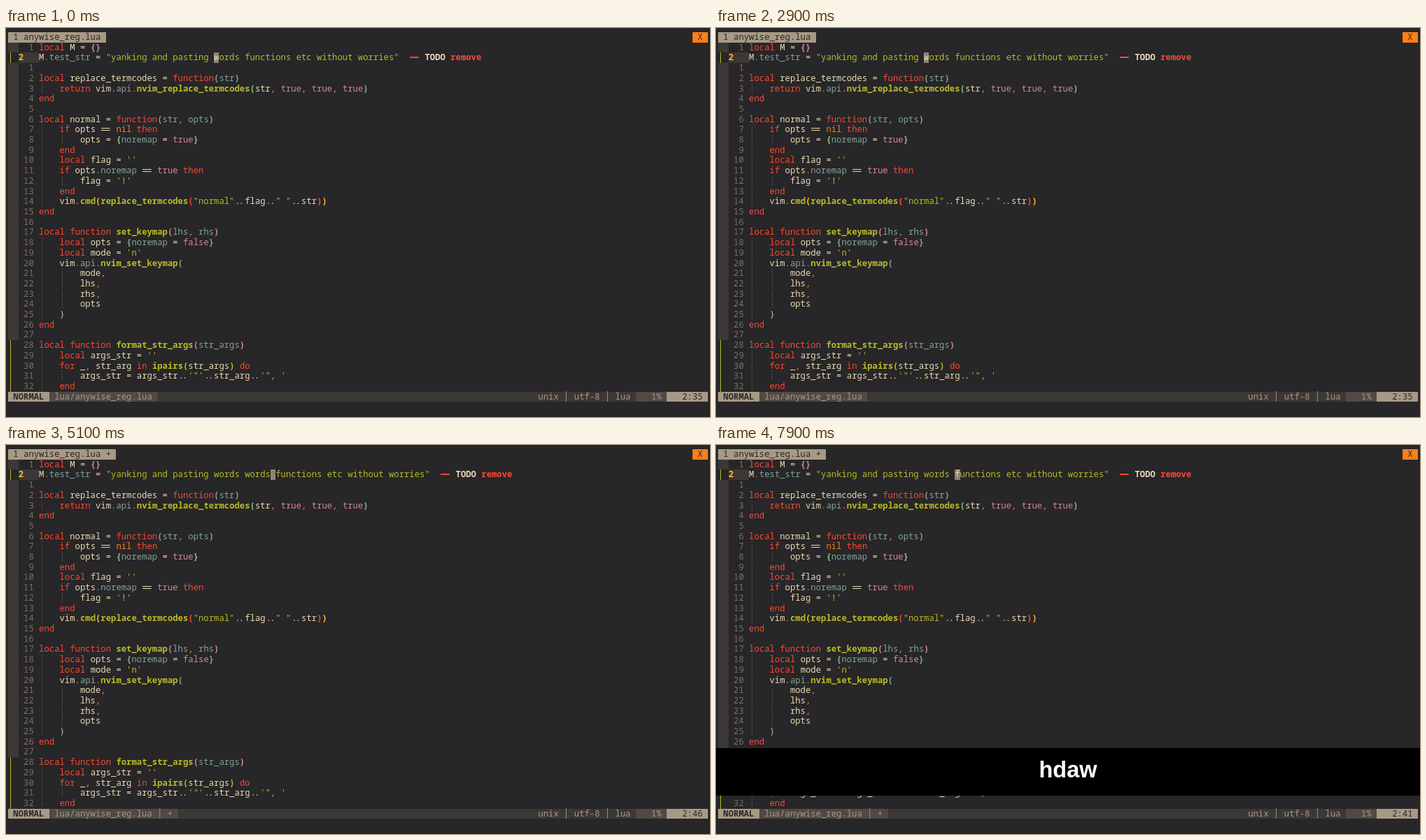
Animation, 1006 px wide and 557 px high, one loop 8000 ms. Source, as an HTML page:

```html
<!DOCTYPE html>
<html lang="en">
<head>
<meta charset="utf-8">
<title>Editor session</title>
<style>
  :root {
    --w: 7.353px; --h: 14.706px;
    --bg: #272628; --bg1: #3c3836; --bg2: #504945; --tan: #a89984; --fg: #ebdbb2;
    --red: #fb4934; --green: #b8bb26; --orange: #fe8019;
  }
  html, body { margin: 0; width: 100%; height: 100%; overflow: hidden; background: var(--bg); }
  #stage { position: relative; width: 1006px; height: 557px; overflow: hidden; background: var(--bg);
    color: var(--fg); font: 12.255px/14.706px "Noto Sans Mono", monospace;
    font-variant-ligatures: none; }
  .cell { position: absolute; white-space: pre; height: var(--h); }
  .r { color: var(--red) } .g { color: var(--green) } .b { color: #83a598 }
  .p { color: #d3869b } .o { color: var(--orange) } .y { color: #fabd2f } .a { color: #8ec07c }
  .num { color: #7c6f64 }
  .bold { font-weight: bold }
  .eq { color: transparent; background:
    linear-gradient(var(--fg), var(--fg)) 1px 7px / 12.7px 1px no-repeat,
    linear-gradient(var(--fg), var(--fg)) 1px 10px / 12.7px 1px no-repeat; }
  .dash { color: transparent;
    background: linear-gradient(var(--red), var(--red)) 1px 8px / 12.7px 2px no-repeat; }
  .join { letter-spacing: -2px; margin: 0 3px 0 1px; }
  .guide { width: 1px; margin-left: 3.4px;
    background: repeating-linear-gradient(#5a524c 0 2.4px, transparent 2.4px 3.676px); }
  .gutter { background: var(--bg1); }
  .sign { width: 1.4px; margin-left: 2.6px; background: var(--green); }
  .tan { background: var(--tan); color: #282828; }
  .mid { background: var(--bg2); color: var(--tan); }
  .bar { background: var(--bg1); color: var(--tan); }
  .hot { background: var(--orange); color: #282828; }
  .cursor { width: var(--w); background: var(--tan); color: #282828; }
  .cursor.dim { background: #8f8374; color: var(--fg); }
  .cursor.pending { background: linear-gradient(var(--tan), var(--tan)) 0 100% / 100% 3px no-repeat; color: transparent; }
  #keys { position: absolute; z-index: 1; left: 0; top: 434px; width: 1006px; height: 68px;
    background: #000; color: #fff; text-align: center;
    font: bold 32.5px/62px "Liberation Sans", Arial, sans-serif; }
  #keys u { text-decoration-thickness: 2px; text-underline-offset: 4px; text-decoration-skip-ink: none; }
</style>
</head>
<body>
<div id="stage"><div id="keys" hidden></div></div>
<script>
const W = 7.353, H = 14.706, LOOP = 8000;
const stage = document.getElementById('stage');
const keys = document.getElementById('keys');

// "@" marks fields and parameters, "!" function names; the second item colours the brackets.
const code = [
  ['local M = {}', 'pp'],
  [''],
  [''],
  ['local replace_termcodes = function(@str)', 'bb'],
  ['    return vim.@api.!nvim_replace_termcodes(str, true, true, true)', 'aa'],
  ['end'],
  [''],
  ['local normal = function(@str, @opts)', 'bb'],
  ['    if opts == nil then'],
  ['        opts = {@noremap = true}', 'aa'],
  ['    end'],
  ["    local flag = ''"],
  ['    if opts.@noremap == true then'],
  ["        flag = '!'"],
  ['    end'],
  ['    vim.!cmd(!replace_termcodes("normal"..flag.." "..str))', 'yrry'],
  ['end'],
  [''],
  ['local function !set_keymap(@lhs, @rhs)', 'pp'],
  ['    local opts = {@noremap = false}', 'bb'],
  ["    local mode = 'n'"],
  ['    vim.@api.!nvim_set_keymap(', 'b'],
  ['        mode,'],
  ['        lhs,'],
  ['        rhs,'],
  ['        opts'],
  ['    )', 'b'],
  ['end'],
  [''],
  ['local function !format_str_args(@str_args)', 'pp'],
  ["    local args_str = ''"],
  ['    for _, str_arg in !ipairs(str_args) do', 'gg'],
  ["        args_str = args_str..'\"'..str_arg..'\", '"],
  ['    end']
];

const rules = [
  [/^["']/, 'g'], [/^==$/, 'eq'], [/^--$/, 'dash'], [/^\.\.$/, 'join'],
  [/^(local|function|return|end|if|then|for|in|do)$/, 'r'],
  [/^(true|false)$/, 'p'], [/^(nil|,|\.)$/, 'o'],
  [/^TODO$/, 'bold'], [/^remove$/, 'r bold'], [/^@/, 'b'], [/^!/, 'g bold']
];

function paint(el, text, brackets = '') {
  let n = 0;
  const tokens = text.match(/"[^"]*"|'[^']*'|[@!]?\w+|==|--|\.\.|\s+|./g) || [];
  el.replaceChildren(...tokens.map(tok => {
    const span = document.createElement('span');
    const rule = rules.find(([re]) => re.test(tok));
    span.className = /^[(){}]$/.test(tok) ? brackets[n++] + ' bold' : rule ? rule[1] : '';
    span.textContent = tok.replace(/^[@!]/, '');
    return span;
  }));
}

function cell(col, row, cls = '', text = '', cols = 0) {
  const el = document.createElement('div');
  el.className = 'cell ' + cls;
  el.textContent = text;
  el.style.left = 3 + col * W + 'px';
  el.style.top = 6 + row * H + 'px';
  if (cols) el.style.width = cols * W + 'px';
  return stage.appendChild(el);
}

// Gutter and code
const lines = code.map(([text, brackets], i) => {
  const row = i + 1, current = row === 2;
  if (current || row >= 30) cell(0, row, 'sign');
  else cell(0, row, 'gutter', '', 2);
  if (current) cell(2, row, 'gutter y bold', '2', 4);
  else cell(2, row, 'num', String(Math.abs(row - 2)).padStart(3));
  const indent = text.search(/\S|$/);
  for (let c = 0; c < indent; c += 4) cell(6 + c, row, 'guide');
  const el = cell(6, row);
  paint(el, text, brackets);
  return el;
});

// Tab line, status line and changing parts
const tab = cell(0, 0, 'tan');
cell(133, 0, 'hot', ' X ', 3);
cell(0, 35, 'bar', '', 136);
cell(0, 35, 'tan bold', ' NORMAL ', 8);
const file = cell(8, 35, 'mid');
cell(103, 35, 'bar', 'unix │ utf-8 │ lua ');
cell(122, 35, 'mid', '   1% ', 6);
const ruler = cell(128, 35, 'tan', '', 8);
const pending = cell(126, 36);
const yanked = cell(40, 2, 'hot', 'words ', 6);
const cursor = cell(0, 2, 'cursor');

// time, shown keys, cursor column, pending command, edit state
const steps = [
  [0, '', 35, '', 0],
  [1400, 'y', 35, 'y', 0],
  [1580, 'ya', 35, 'ya', 0],
  [1750, 'yaw', 35, '', 0],
  [2900, '', 35, '', 0],
  [3700, 'p', 46, '', 1],
  [4900, '', 46, '', 1],
  [5250, 'h', 45, '', 1],
  [6350, 'hd', 45, 'd', 1],
  [6750, 'hda', 45, 'da', 1],
  [6850, 'hdaw', 41, '', 2]
];
const blinkOff = [[400, 900], [2300, 2850], [3350, 3700], [4200, 4700], [5750, 6250], [7280, 7750]];
const within = (t, [from, to]) => t >= from && t < to;

let last = '';
function draw(t) {
  const step = steps.findLast(s => s[0] <= t);
  const [at, typed, col, cmd, edit] = step;
  const recent = typed && t - at < 300;
  const off = blinkOff.some(span => within(t, span));
  const flash = within(t, [1750, 1950]);
  const fresh = (col === 45 || edit === 1 && t < 4200 || edit === 2 && t < 7280) && !cmd;
  const state = [at, recent, off, flash, fresh].join();
  if (state === last) return;
  last = state;

  const words = edit === 1 ? 'words words' : 'words';
  const line = `M.@test_str = "yanking and pasting ${words} functions etc without worries"  -- TODO remove`;
  paint(lines[1], line);
  tab.textContent = ` 1 anywise_reg.lua ${edit ? '+ ' : ''}`;
  file.textContent = ` lua/anywise_reg.lua ${edit ? '│ + ' : ''}`;
  ruler.textContent = `   2:${col} `;
  pending.textContent = cmd;
  yanked.hidden = !flash;

  cursor.hidden = off;
  cursor.className = 'cell cursor' + (cmd ? ' pending' : fresh ? '' : ' dim');
  cursor.style.left = 3 + (col + 5) * W + 'px';
  cursor.textContent = line.replace('@', '')[col - 1];

  keys.hidden = !typed;
  const tail = document.createElement(recent ? 'u' : 'span');
  tail.textContent = typed.slice(-1);
  keys.replaceChildren(typed.slice(0, -1), tail);
}

const start = performance.now();
function tick() {
  draw((performance.now() - start) % LOOP);
  requestAnimationFrame(tick);
}
tick();
</script>
</body>
</html>
```
